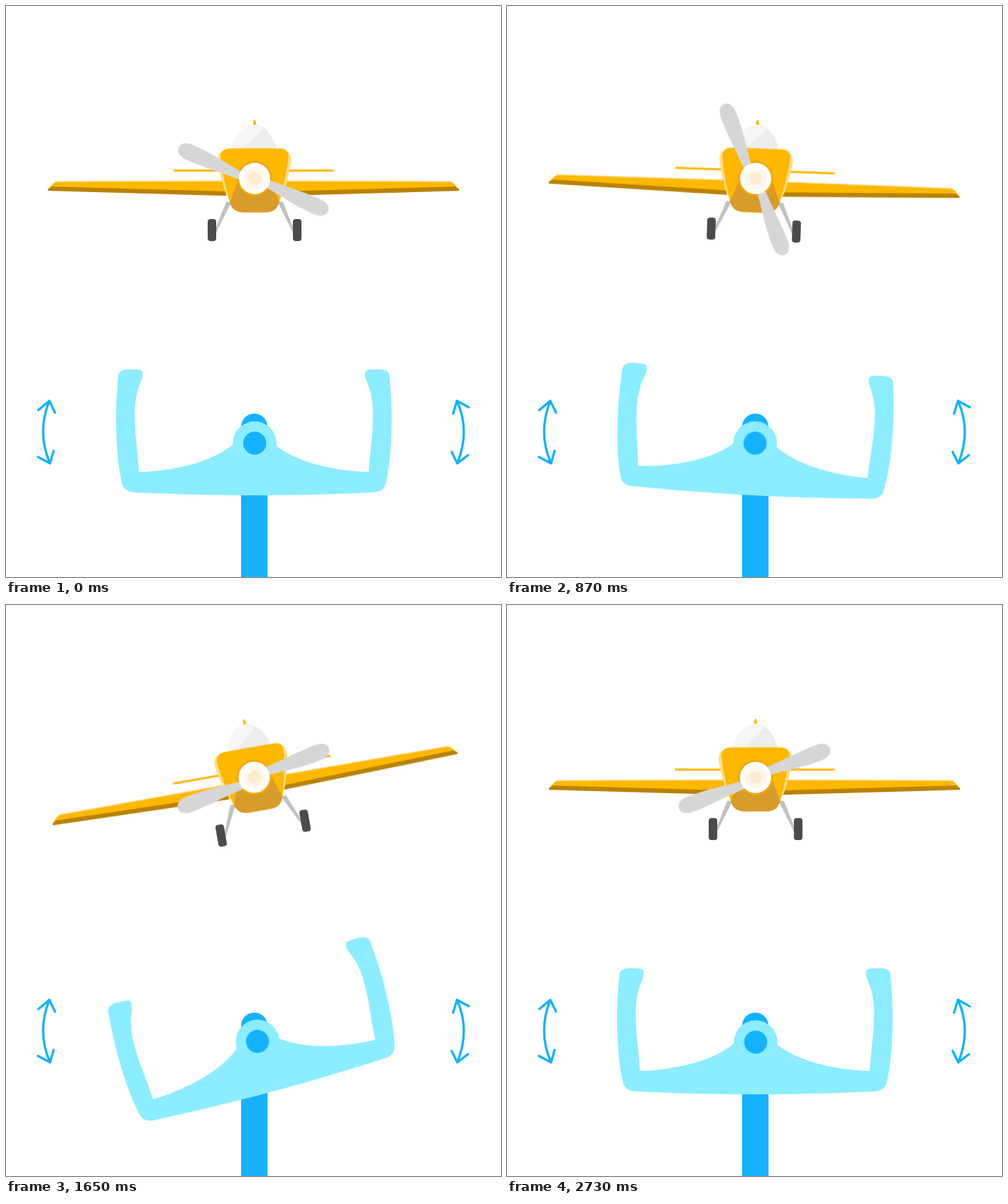
Animation, 697 px wide and 804 px high, one loop 2.76 s. Source, as an HTML page:

```html
<!DOCTYPE html>
<html lang="en">
<head>
<meta charset="utf-8">
<title>Roll control</title>
<style>
  html, body { margin: 0; width: 100%; height: 100%; overflow: hidden; background: #fff; }
  svg { display: block; width: 697px; height: 804px; }

  /* 30 ms ticks; the small negative delay keeps ticks clear of rounding */
  .roll { animation: roll 2760ms infinite -4ms; }
  .plane { --bank: 30deg; transform-origin: 348.5px 246px; }
  .yoke { --bank: 45deg; transform-origin: 348.5px 600px; }
  .spin { animation: spin 120ms steps(4) infinite -4ms; }

  @keyframes roll {
    0% { transform: rotate(0deg); animation-timing-function: steps(15); }
    16.3043478% { transform: rotate(var(--bank)); animation-timing-function: steps(30); }
    48.9130435% { transform: rotate(calc(-1 * var(--bank))); animation-timing-function: steps(15); }
    65.2173913%, 100% { transform: rotate(0deg); }
  }
  @keyframes spin {
    from { transform: rotate(23.1deg); }
    to { transform: rotate(203.1deg); }
  }
</style>
</head>
<body>
<svg viewBox="0 0 697 804">
  <defs>
    <g id="wing">
      <path d="M70 246.6L310 245.4V250H68Z" fill="#ffdf91"/>
      <path d="M59 258L67 249.5Q69 247.7 72 247.7L310 247V264L62 258Z" fill="#ffb800"/>
      <path d="M64.5 254.3L310 261V267.3L61 260.3Q57.5 260 59.5 257.8Z" fill="#ba8200"/>
    </g>
    <g id="gear">
      <path d="M310 276L318 275L296 319V311Z" fill="#c1c1c1"/>
      <rect x="284" y="300" width="12" height="31" rx="4" fill="#4b4b4b"/>
    </g>
    <path id="blade" d="M-18-3C-45-6-70-11-95-11.5C-108-12-114.4-7-114.4 0C-114.4 7-108 11.5-95 11.5C-72 11.5-48 9-18 8Z"/>
    <path id="halfYoke" d="M350 689C280 689 230 687 181 685C170 684 165 680 163 671C157 645 155 610 155 580C155 555 157 535 158 521C158 513 168 511 176 511.5L186 512C192 512 193.500 516 192 523C190 530 187 535 185 543C181 560 181 570 181.500 585C182 610 186 630 187 656C240 655 295 640 321 616L350 600Z"/>
    <path id="fuselage" d="M316 200.500H385Q398 200.500 397.500 213Q396 232 385 275Q381 290.500 366 290.500H334Q319 290.500 315 276Q304 236 302 213Q302 200.500 316 200.500Z"/>
    <clipPath id="hull"><use href="#fuselage"/></clipPath>
  </defs>

  <g class="roll plane">
    <use href="#wing"/>
    <use href="#wing" transform="matrix(-1 0 0 1 697 0)"/>
    <path d="M237.500 231.700H460" stroke="#ffb800" stroke-width="3" stroke-linecap="round"/>
    <use href="#gear"/>
    <use href="#gear" transform="matrix(-1 0 0 1 700 0)"/>
    <path d="M347.300 169Q348 161 350 159.500Q352 161 352.500 169Z" fill="#ffb800"/>
    <path d="M318 202C322 180 338 167 350 167C362 167 377 180 381 202Z" fill="#ededed"/>
    <path d="M318 202C322 180 338 167 350 167Q357 167.500 363 173L333 202Z" fill="#f6f6f6"/>
    <path d="M308 202Q298 206 298 216Q299 232 309 262L320 284H380L391 262Q401 230 401.500 216Q401 206 392 202Z" fill="#ffdc86"/>
    <use href="#fuselage" fill="#ffb800"/>
    <path d="M328 243L312 285V292H388V285L373 243Z" fill="#d99b2a" clip-path="url(#hull)"/>
    <circle cx="350" cy="243" r="25" fill="#f0a800"/>
  </g>

  <g transform="translate(348.4 244.3)" fill="#d6d6d6">
    <g class="spin">
      <use href="#blade"/>
      <use href="#blade" transform="rotate(180)"/>
    </g>
  </g>

  <g class="roll plane">
    <circle cx="350" cy="242.800" r="22" fill="#fff"/>
    <circle cx="350" cy="242.800" r="15.500" fill="#fef7ec"/>
    <circle cx="350" cy="242.800" r="9" fill="#fdecce"/>
  </g>

  <path d="M331 804V592.500A18.600 18.600 0 0 1 368.200 592.500V804Z" fill="#14b2ff"/>

  <g class="roll yoke" fill="#8bedff">
    <use href="#halfYoke"/>
    <use href="#halfYoke" transform="matrix(-1 0 0 1 698 0)"/>
    <circle cx="350.200" cy="615.500" r="30.700"/>
    <circle cx="350.200" cy="615.500" r="16.200" fill="#14b2ff"/>
  </g>

  <g fill="none" stroke="#14b2ff" stroke-width="3.300" stroke-linecap="round" stroke-linejoin="round">
    <path d="M61 556Q43 601 62 644M45.500 569L61 556L69 572.500M45 635L62 644L67 626.500"/>
    <path d="M635 556Q654 598 635.500 644M629.500 574L635 556L651.500 565M627.500 628L635.500 644L650.500 632.500"/>
  </g>
</svg>
</body>
</html>
```
